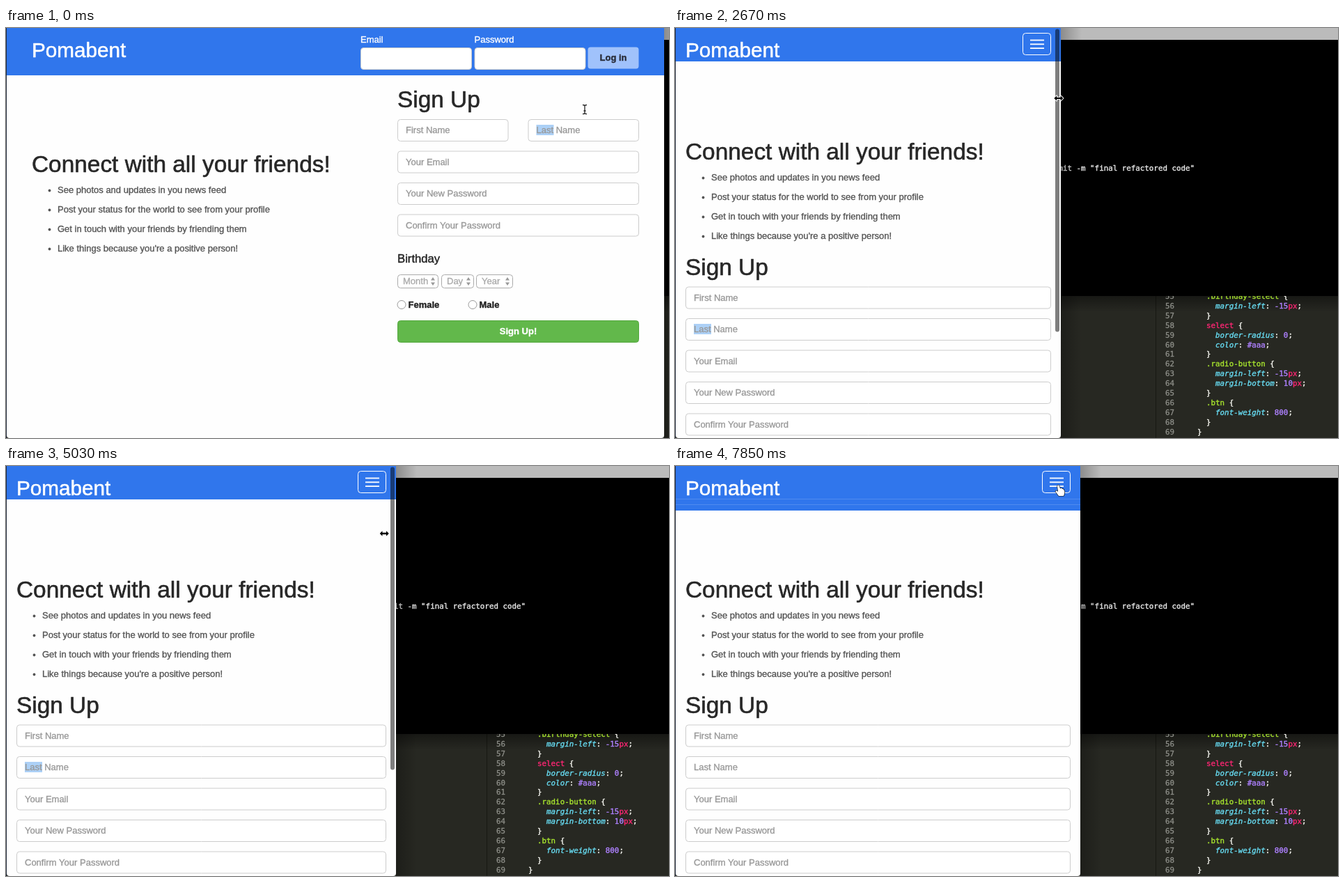
Write an HTML page with a canvas that moves like this. It is 952 by 589 pixels and loops after 8 s.

```html
<!DOCTYPE html>
<html lang="en">
<head>
<meta charset="utf-8">
<style>
html, body { margin: 0; width: 100%; height: 100%; overflow: hidden; background: #000; }
canvas { display: block; }
</style>
</head>
<body>
<canvas id="stage" width="952" height="589"></canvas>
<script>
const c = document.getElementById('stage').getContext('2d');
const LOOP = 8000, TICK = 148, BLUE = '#3076ec', BAR = 48;
const SANS = '"Liberation Sans", Arial, sans-serif';
const MONO = '10.83px "DejaVu Sans Mono", monospace';
const INK = { w: '#f8f8f2', g: '#a6e22e', p: '#f92672', c: '#66d9ef', v: '#ae81ff', y: '#e6db74', d: '#75715e', o: '#e07b14', t: '#e6e6e6' };

// Piecewise-linear tracks, keyed in ticks
const WINDOW = [[7, 945], [8, 925], [9, 868], [13, 665], [15, 632], [22, 450], [23, 450], [26, 396], [31, 396], [32, 440], [34, 560], [35, 582]];
const LAG = [[21, 0], [22, -8], [23, 0], [30, 0], [31, 14], [32, 0]];
const MENU = [[42, BAR], [43, 80], [45, 225], [46, 246], [51, 246], [53, 64]];
const CURSOR_X = [[0, 831], [2, 860], [5, 943], [7, 943], [8, 836], [9, 790], [13, 661], [15, 640], [22, 432], [23, 425], [28, 305], [29, 305], [31, 427], [35, 582], [36, 582], [41, 552]];
const CURSOR_Y = [[0, 117], [2, 125], [5, 110], [7, 110], [8, 102], [13, 97], [22, 104], [31, 97], [36, 97], [41, 35]];

function at(track, n) {
  let prev = track[0];
  for (const key of track) {
    if (n <= key[0]) {
      const span = key[0] - prev[0];
      return span ? prev[1] + (key[1] - prev[1]) * (n - prev[0]) / span : key[1];
    }
    prev = key;
  }
  return prev[1];
}

function rect(x, y, w, h, color) {
  c.fillStyle = color;
  c.fillRect(x, y, w, h);
}

function box(x, y, w, h, r, fill, border) {
  c.beginPath();
  c.roundRect(x + .5, y + .5, w - 1, h - 1, r);
  if (fill) { c.fillStyle = fill; c.fill(); }
  if (border) { c.strokeStyle = border; c.lineWidth = 1; c.stroke(); }
}

// A hairline stroke gives the heavier look of smoothed screen text
function glyphs(str, x, y, color, heft) {
  c.fillStyle = c.strokeStyle = color;
  c.lineWidth = heft;
  c.lineJoin = 'round';
  c.fillText(str, x, y);
  c.strokeText(str, x, y);
}

function text(str, x, y, size, color, weight = '', align = 'left') {
  c.font = `${weight} ${size}px ${SANS}`;
  c.textAlign = align;
  glyphs(str, x, y, color, .2 + size * .012);
}

function fade(x0, y0, x1, y1, from, to, x, y, w, h) {
  const g = c.createLinearGradient(x0, y0, x1, y1);
  g.addColorStop(0, from);
  g.addColorStop(1, to);
  rect(x, y, w, h, g);
}

// Coloured runs: "w:text|p:text"; an asterisk after the ink letter means italic
function code(line, x, y) {
  c.textAlign = 'left';
  for (const run of line.split('|')) {
    const [, ink, slant, str] = run.match(/^(.)(\*?):(.*)$/);
    c.font = (slant ? 'italic ' : '') + MONO;
    glyphs(str, x, y, INK[ink], .4);
    x += c.measureText(str).width;
  }
}

const CSS_LINES = [
  'g:  .birthday-select|w: {', 'c*:    margin-left|w:: |v:-15|p:px|w:;', 'w:  }',
  'p:  select|w: {', 'c*:    border-radius|w:: |v:0|w:;', 'c*:    color|w:: |v:#aaa|w:;', 'w:  }',
  'g:  .radio-button|w: {', 'c*:    margin-left|w:: |v:-15|p:px|w:;', 'c*:    margin-bottom|w:: |v:10|p:px|w:;', 'w:  }',
  'g:  .btn|w: {', 'c*:    font-weight|w:: |v:800|w:;', 'w:  }', 'w:}'
];
const HTML_LINES = [
  [0, 396, 'w: navigation</|p:span|w:>'], [1, 396, 'p:n|w:>'], [2, 396, 'p:n|w:>'], [3, 396, 'p:n|w:>'],
  [6, 394.5, 'd:-->'], [7, 395.5, 'y:apse collapse"|w:>'], [8, 395.5, 'y:right"|w:>'], [11, 396, 'y:rm-control"|w:>']
];

function desktop() {
  rect(0, 0, 952, 589, '#000');
  rect(0, 385, 952, 204, '#272822');
  rect(690, 385, 1, 204, '#171812');
  fade(0, 385, 0, 408, 'rgba(0,0,0,.4)', 'rgba(0,0,0,0)', 0, 385, 952, 23);
  CSS_LINES.forEach((line, i) => {
    const y = 389 + i * 13.9;
    c.font = MONO;
    c.textAlign = 'right';
    glyphs(55 + i, 717, y, '#8f908a', .3);
    code(line, 750, y);
  });
  for (const [row, x, line] of HTML_LINES) code(line, x, 409 + row * 13.95);
  rect(0, 17, 952, 368, '#000');
  rect(0, 0, 952, 17, '#bbb');
  code('o:page$|t: git add .; git commit -m "final refactored code"', 394, 205);
  code('o:page$|t: git push', 394, 252);
  code('o:page$', 394, 379);
  box(434, 367, 6, 16, 0, null, '#ccc');
}

function field(x, y, w, hint, selected) {
  box(x, y, w, 32, 4, '#fff', '#ccc');
  if (selected) rect(x + 12, y + 8, 25, 15, '#acd0f6');
  text(hint, x + 12, y + 20, 13, '#999');
}

function dropdown(x, y, w, label) {
  box(x, y, w, 20, 4, '#fff', '#aaa');
  text(label, x + 8, y + 14, 13, '#aaa');
  c.fillStyle = '#999';
  c.beginPath();
  for (const d of [-1, 1]) {
    c.moveTo(x + w - 11, y + 10 + d * 1.5);
    c.lineTo(x + w - 5, y + 10 + d * 1.5);
    c.lineTo(x + w - 8, y + 10 + d * 6);
  }
  c.fill();
}

function radio(x, y, label) {
  c.beginPath();
  c.arc(x + 6, y, 6, 0, 7);
  c.fillStyle = '#fff';
  c.fill();
  c.strokeStyle = '#999';
  c.lineWidth = 1;
  c.stroke();
  text(label, x + 15.5, y + 4, 13, '#222', 'bold');
}

function loginButton(x, y) {
  box(x, y, 74, 32, 4, '#a0c2fb');
  text('Log in', x + 37, y + 20, 13, '#282c38', 'bold', 'center');
}

// Returns the extra height used when the heading wraps
function pitch(x, y, width) {
  const wraps = width < 430;
  const lines = wraps ? ['Connect with all your', 'friends!'] : ['Connect with all your friends!'];
  lines.forEach((line, i) => text(line, x, y + i * 36.3, 33.4, '#272727'));
  const extra = wraps ? 36.3 : 0;
  ['See photos and updates in you news feed',
   'Post your status for the world to see from your profile',
   'Get in touch with your friends by friending them',
   "Like things because you're a positive person!"].forEach((item, i) => {
    const base = y + extra + 30 + i * 28;
    text(item, x + 37, base, 13, '#555');
    c.beginPath();
    c.arc(x + 25.5, base - 3.5, 1.9, 0, 7);
    c.fill();
  });
  return extra;
}

function widePage(width) {
  const content = width > 920 ? 872 : 668;
  const column = (content + 28) / 12;
  const left = Math.round((width + 1 - content) / 2);
  const right = left + content;
  rect(1, 0, width - 1, 68, BLUE);
  text('Pomabent', left, 42, 29.7, '#fff');
  ['Email', 'Password'].forEach((label, i) => {
    const x = right - 400 + i * 163.5;
    text(label, x, 21, 13, '#fff');
    box(x, 28, 160, 32, 4, '#fff', '#ccc');
  });
  loginButton(right - 74, 27);
  pitch(left, 207, column * 7 - 28);

  const w = column * 5 - 28, x = right - w, half = (w - 28) / 2;
  text('Sign Up', x, 114, 33.4, '#272727');
  field(x, 131, half, 'First Name');
  field(x + half + 28, 131, half, 'Last Name', true);
  ['Your Email', 'Your New Password', 'Confirm Your Password'].forEach((hint, i) =>
    field(x, 176.5 + i * 45.5, w, hint));
  text('Birthday', x, 337, 16.7, '#222');
  dropdown(x, 354, 59, 'Month');
  dropdown(x + 63, 354, 47, 'Day');
  dropdown(x + 113, 354, 53, 'Year');
  radio(x, 397.5, 'Female');
  radio(x + 102, 397.5, 'Male');
  box(x, 420, w, 32, 4, '#62b84b', '#53a83e');
  text('Sign Up!', x + w / 2, 440, 13, '#fff', 'bold', 'center');
}

function menu(width, height) {
  c.save();
  c.beginPath();
  c.rect(1, 47, width, height - 47);
  c.clip();
  for (const y of [47, 55, 232]) rect(1, y, width, 1, 'rgba(255,255,255,.15)');
  ['Email', 'Password'].forEach((label, i) => {
    text(label, 15, 78 + i * 63, 13, '#fff');
    box(15, 87 + i * 63, width - 29, 32, 4, '#fff', '#ccc');
  });
  loginButton(15, 191);
  c.restore();
}

function narrowPage(width, n) {
  const extra = pitch(15, 189, width - 29), w = width - 29;
  text('Sign Up', 15, 355 + extra, 33.4, '#272727');
  ['First Name', 'Last Name', 'Your Email', 'Your New Password', 'Confirm Your Password'].forEach((hint, i) =>
    field(15, 371.5 + extra + i * 45.5, w, hint, i === 1 && n < 43));

  const height = at(MENU, n);
  rect(1, 0, width - 1, height, BLUE);
  text('Pomabent', 15, 42, 29.7, '#fff');
  box(width - 55, 7, 41, 32, 4, null, '#fff');
  for (const y of [16.6, 22.4, 28.2]) rect(width - 44, y, 20, 1.8, '#fff');
  if (height > BAR) menu(width, height);

  if (n < 43) {
    const hovered = n >= 37, thick = hovered ? 11 : 7;
    if (hovered) rect(width - 14, 0, 14, 589, 'rgba(250,250,250,.22)');
    box(width - thick - 1.5, 1, thick, extra ? 417 : 436, 4, 'rgba(0,0,0,.5)');
  }
}

function browser(n) {
  const edge = Math.round(at(WINDOW, n));
  const width = edge + Math.round(at(LAG, n));
  fade(edge, 0, edge + 30, 0, 'rgba(0,0,0,.25)', 'rgba(0,0,0,0)', edge, 0, 30, 589);
  rect(0, 0, 1, 589, '#1d2536');
  c.save();
  c.beginPath();
  c.roundRect(1, -5, edge - 1, 594, 4);
  c.clip();
  rect(1, 0, edge, 589, '#fefefe');
  if (width > 712) widePage(width);
  else narrowPage(width, n);
  c.restore();
}

const ARROW = new Path2D('M0 0V14L3.2 11L5.5 16L7.6 15L5.4 10.2H10Z');
const HAND = new Path2D('M-3 -6C-3 -8 -.5 -8 0 -6L1 -2.5C3 -4 4 -2.5 4 -2C6 -2.5 6.5 -1 6.5 0C8 0 7.5 5 6 8H-1L-5.5 2C-6 0 -4 0 -2 2Z');
const RESIZE = new Path2D('M-6.5 0L-2.8 -3.7V-1.2H2.8V-3.7L6.5 0L2.8 3.7V1.2H-2.8V3.7Z');
const BEAM = new Path2D('M-3 -6.5Q0 -6.5 0 -5Q0 -6.5 3 -6.5M0 -5V5M-3 6.5Q0 6.5 0 5Q0 6.5 3 6.5M-1.5 2H1.5');

function pointer(n) {
  c.save();
  c.translate(at(CURSOR_X, n), at(CURSOR_Y, n));
  c.lineJoin = 'round';
  if (n < 5) {
    c.strokeStyle = '#222';
    c.lineWidth = 1.3;
    c.stroke(BEAM);
  } else {
    const hand = n >= 40;
    const shape = hand ? HAND : n >= 38 ? ARROW : RESIZE;
    c.lineWidth = hand ? 1.2 : 2;
    c.strokeStyle = hand ? '#000' : '#fff';
    c.fillStyle = hand ? '#fff' : '#000';
    c.stroke(shape);
    c.fill(shape);
  }
  c.restore();
}

function draw() {
  const n = Math.min(53, Math.floor((performance.now() % LOOP + 10) / TICK));
  desktop();
  browser(n);
  pointer(n);
  requestAnimationFrame(draw);
}
draw();
</script>
</body>
</html>
```
